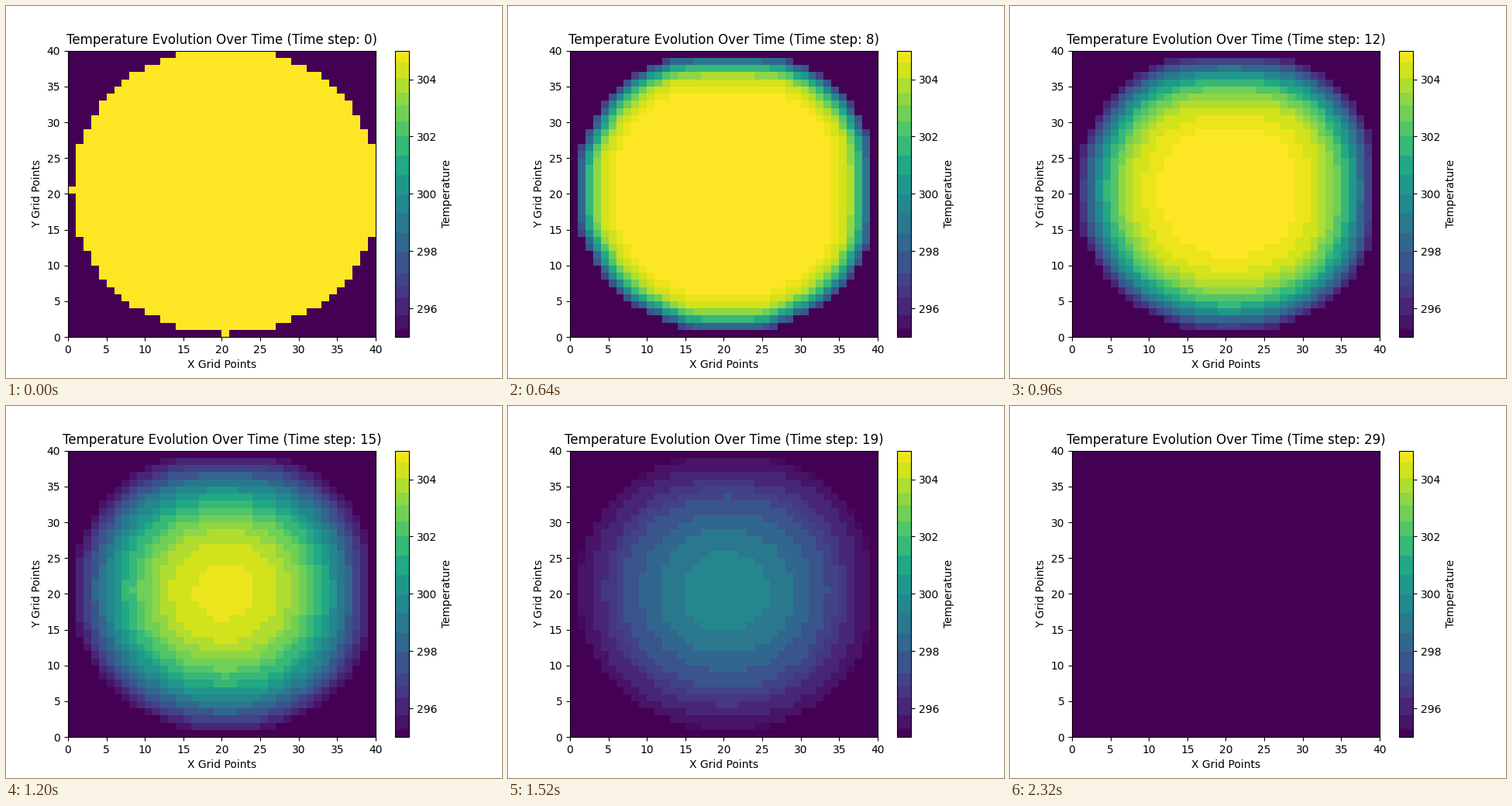
Animation, 640 px wide and 480 px high, one loop 2.4 s. Source, as a matplotlib script:

```python
import matplotlib.pyplot as plt
import numpy as np
from matplotlib.animation import FuncAnimation
from matplotlib.colors import ListedColormap

SIZE = 40
FRAMES = 30
COLD, HOT = 295.0, 305.0
DIFFUSION = 0.2

# Uneven colour bands over viridis, as fractions of the range
BAND_EDGES = [0, .024, .03, .076, .138, .176, .222, .297, .363, .434, .499,
              .566, .634, .702, .753, .81, .854, .905, .957, .987, 1]


def banded_viridis(samples=1000):
    edges = np.array(BAND_EDGES)
    tones = (edges[:-1] + edges[1:]) / 2
    tones[0], tones[-1] = 0, 1
    position = (np.arange(samples) + 0.5) / samples
    band = np.searchsorted(edges, position) - 1
    return ListedColormap(plt.get_cmap("viridis")(tones[band]))


def simulate(steps):
    """Cool a hot disc with cold surroundings; return the field at each step."""
    y, x = np.mgrid[:SIZE, :SIZE]
    disc = (x - SIZE // 2) ** 2 + (y - SIZE // 2) ** 2 <= (SIZE // 2) ** 2
    field = np.where(disc, HOT, COLD)
    inner = disc[1:-1, 1:-1]
    wanted = set(steps)
    saved = {}
    for step in range(max(steps) + 1):
        if step in wanted:
            saved[step] = field
        core = field[1:-1, 1:-1]
        laplacian = (field[2:, 1:-1] + field[:-2, 1:-1]
                     + field[1:-1, 2:] + field[1:-1, :-2] - 4 * core)
        new = np.full_like(field, COLD)
        new[1:-1, 1:-1] = np.where(inner, core + DIFFUSION * laplacian, COLD)
        field = new
    return [saved[step] for step in steps]


# Snapshots are spaced logarithmically in time
steps = [int(s) - 1 for s in np.logspace(0, 4, FRAMES)]
fields = simulate(steps)

fig, ax = plt.subplots(figsize=(6.4, 4.8), dpi=100)
grid = np.arange(SIZE + 1)
mesh = ax.pcolormesh(grid, grid, fields[0], cmap=banded_viridis(),
                     vmin=COLD, vmax=HOT)
fig.colorbar(mesh, ax=ax, label="Temperature")
ax.set_xlabel("X Grid Points")
ax.set_ylabel("Y Grid Points")
ax.set_xticks(range(0, SIZE + 1, 5))
ax.set_yticks(range(0, SIZE + 1, 5))


def update(frame):
    mesh.set_array(fields[frame])
    ax.set_title(f"Temperature Evolution Over Time (Time step: {frame})")
    return [mesh]


animation = FuncAnimation(fig, update, frames=FRAMES, interval=80,
                          repeat=True, repeat_delay=0, blit=False)
plt.show()
```
